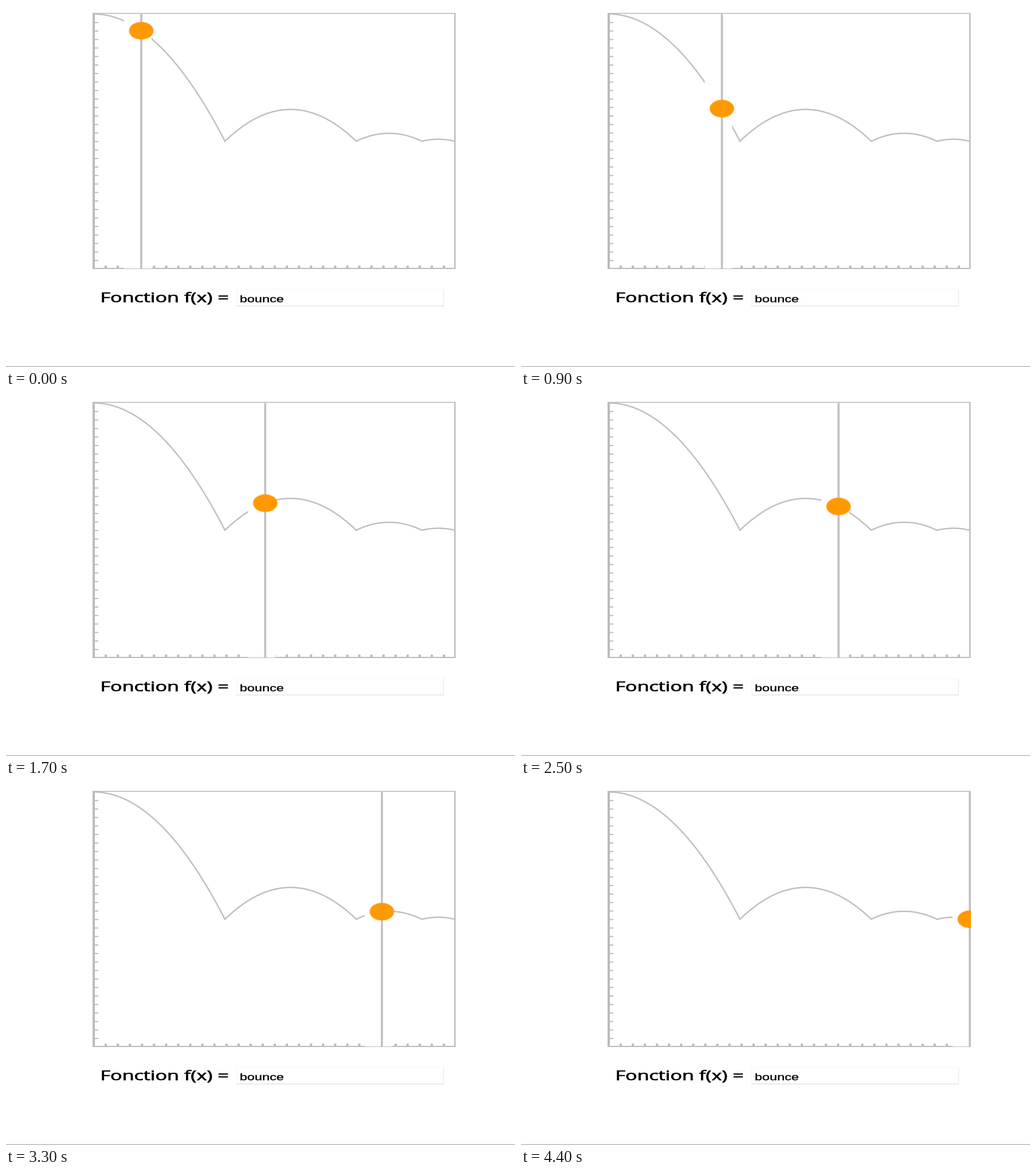
These frames come from a looping animation (888x630 px, 5.5 s). An HTML page with a canvas:

```html
<!DOCTYPE html>
<html lang="fr">
<head>
<meta charset="utf-8">
<title>Bounce</title>
<style>
  html, body { margin: 0; width: 100%; height: 100%; overflow: hidden; background: #fff; }
  canvas { display: block; }
</style>
</head>
<body>
<canvas id="stage" width="888" height="630"></canvas>
<script>
const ctx = document.getElementById('stage').getContext('2d');
const LOOP = 5500, STEP = 100;
const ASPECT = 1.42; // the whole scene is shown wider than tall
const BOX = { left: 153, top: 13, right: 783, bottom: 458 };
const START_X = 236, SPEED = 12.72;
const FLOOR = 236, DROP = 222, FALL = 229;
const CELLS = 30;
const GREY = '#bbb', LINE = '#c0c0c0';

// Height of the bouncing curve: a half parabola, then ever smaller arches.
function curveY(x) {
  const u = (x - BOX.left) / FALL;
  if (u <= 1) return FLOOR - DROP * (1 - u * u);
  let start = 1, width = 1;
  while (u > start + width) {
    start += width;
    width /= 2;
  }
  const v = (u - start) / width;
  return FLOOR - DROP * width * width * v * (1 - v);
}

function rect(x, y, w, h, color) {
  ctx.fillStyle = color;
  ctx.fillRect(x, y, w, h);
}

function drawFrame() {
  const w = BOX.right - BOX.left, h = BOX.bottom - BOX.top;
  for (let i = 1; i < CELLS; i++) {
    rect(154, BOX.top + i * h / CELLS, 7, 2, GREY);
    rect(BOX.left + i * (w + 2) / CELLS - 2, 453, 4, 4, GREY);
  }
  rect(151, 12, 633, 1.6, GREY);
  rect(151, 457, 633, 2, GREY);
  rect(151, 12, 4, 447, GREY);
  rect(782, 12, 2.4, 447, GREY);
}

function drawCurve() {
  ctx.beginPath();
  for (let x = BOX.left; x <= BOX.right; x++) ctx.lineTo(x, curveY(x));
  ctx.strokeStyle = LINE;
  ctx.lineWidth = 2.5;
  ctx.stroke();
}

function drawBall(x, y) {
  ctx.beginPath();
  ctx.ellipse(x, y, 15 * ASPECT - 0.3, 15, 0, 0, 2 * Math.PI);
  ctx.fillStyle = '#f90';
  ctx.fill();
  // soft rim
  ctx.strokeStyle = 'rgba(255, 153, 0, 0.35)';
  ctx.lineWidth = 2;
  ctx.stroke();
}

function drawCursor(x) {
  ctx.save();
  ctx.beginPath();
  ctx.rect(151, 12, 634, 447);
  ctx.clip();
  // clear a strip around the cursor, keeping the right border
  rect(x - 30, 14, Math.min(x + 18, 782) - x + 30, 444, '#fff');
  rect(x - 1.8, 14, 3.6, 444, LINE);
  drawBall(x, curveY(x));
  ctx.restore();
}

function label(text, x, y, font, weight) {
  ctx.save();
  ctx.translate(x, y);
  ctx.scale(ASPECT, 1);
  ctx.font = font;
  ctx.fillStyle = ctx.strokeStyle = '#000';
  ctx.lineWidth = weight;
  ctx.lineJoin = 'round';
  ctx.fillText(text, 0, 0);
  ctx.strokeText(text, 0, 0);
  ctx.restore();
}

function drawForm() {
  label('Fonction f(x) =', 164.5, 516.5, '500 24px "Open Sans", "Noto Sans", sans-serif', 0.7);
  rect(402, 494, 362, 1, '#f8f8f8');
  rect(402, 494, 1, 30, '#f3f3f3');
  rect(763, 494, 1, 30, '#e8e8e8');
  rect(402, 523, 362, 1, '#d8d8d8');
  label('bounce', 407.8, 516.5, '16.5px "Liberation Sans", Arial, sans-serif', 0.35);
  rect(0, 628, 888, 1, '#ddd');
  rect(0, 629, 888, 1, '#bbb');
}

function draw(time) {
  const step = Math.floor((time % LOOP) / STEP);
  rect(0, 0, 888, 630, '#fff');
  drawFrame();
  drawCurve();
  drawCursor(Math.min(START_X + SPEED * step, BOX.right));
  drawForm();
}

const begin = performance.now();
function tick() {
  draw(performance.now() - begin);
  requestAnimationFrame(tick);
}
tick();
</script>
</body>
</html>
```
